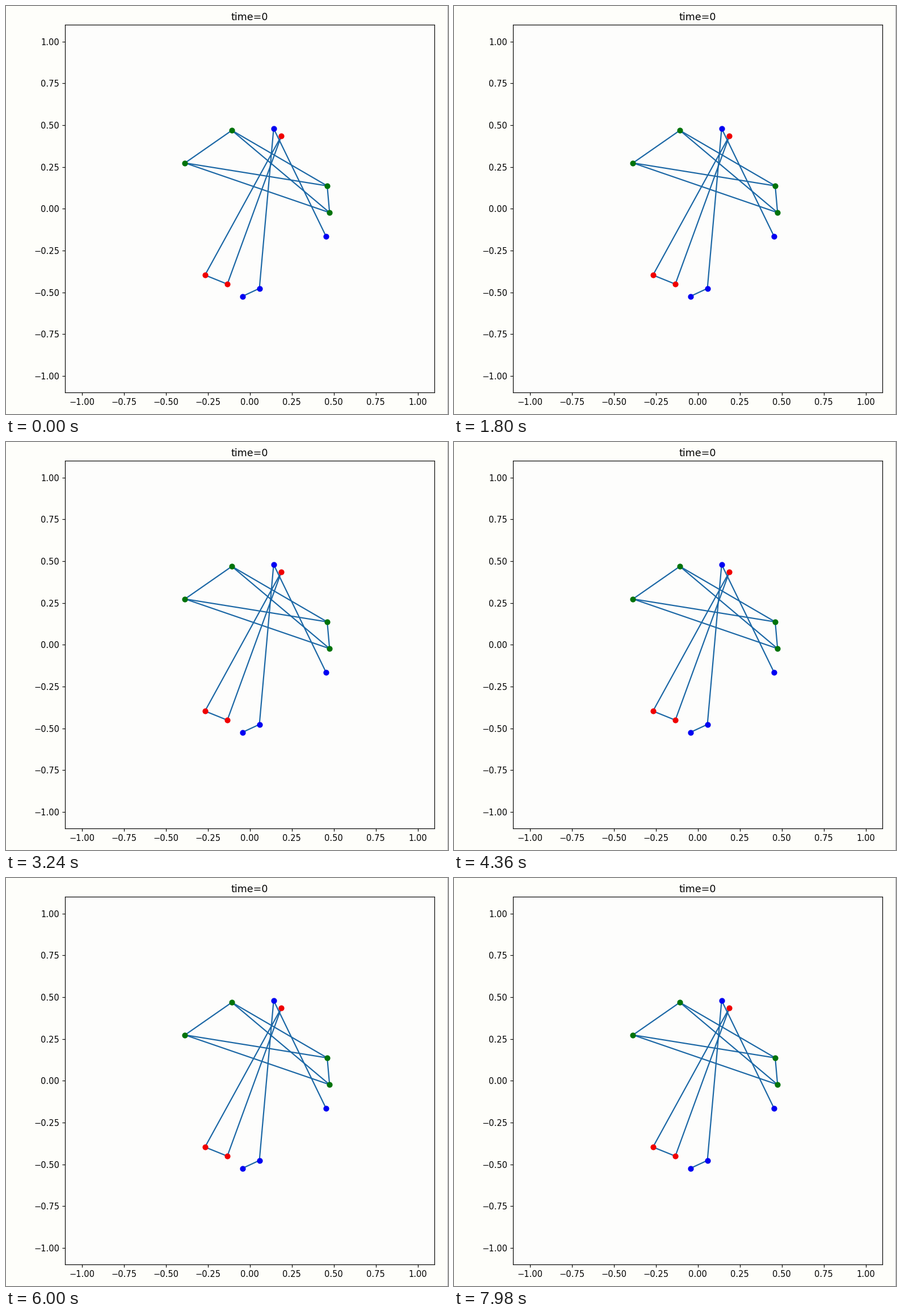
A matplotlib script for the animation above (8000 ms loop, 779 px wide and 719 px high).

```python
from itertools import combinations, pairwise

import matplotlib.pyplot as plt
import numpy as np
from matplotlib.animation import FuncAnimation
from matplotlib.lines import Line2D

W, H, DPI = 779, 719, 105
FRAMES, INTERVAL = 20, 400
LEFT, RIGHT, TOP, BOTTOM = 104.2, 755.2, 33.4, 681.2
LINE = "#1b67a5"


def links_all(nodes):
    return combinations(nodes, 2)


def links_chain(nodes):
    return pairwise(nodes)


# each cluster: colour, wiring rule, node positions
CLUSTERS = [
    ("#f00000", links_all,
     [(0.188, 0.436), (-0.267, -0.397), (-0.134, -0.451)]),
    ("#0000f2", links_chain,
     [(0.455, -0.167), (0.142, 0.480), (0.057, -0.477), (-0.044, -0.524)]),
    ("#00730a", links_all,
     [(-0.107, 0.469), (-0.386, 0.274), (0.461, 0.137), (0.475, -0.023)]),
]

plt.rcParams["font.family"] = "DejaVu Sans"

fig = plt.figure(figsize=((W + 0.001) / DPI, (H + 0.001) / DPI), dpi=DPI,
                 facecolor="#fefefa")
ax = fig.add_axes([LEFT / W, 1 - BOTTOM / H,
                   (RIGHT - LEFT) / W, (BOTTOM - TOP) / H],
                  facecolor="#fdfdfc")

# thin grey border in the last pixel column
fig.add_artist(Line2D([(W - 0.75) / W] * 2, [0, 1], color="#b4b4b4",
                      lw=72 / DPI))

for color, links, nodes in CLUSTERS:
    for ends in links(nodes):
        ax.plot(*zip(*ends), color=LINE, lw=1.5, zorder=2)
    ax.plot(*zip(*nodes), "o", color=color, ms=6, zorder=3)

ticks = np.arange(-1, 1.01, 0.25)
ax.set(xlim=(-1.1, 1.1), ylim=(-1.1, 1.1), xticks=ticks, yticks=ticks)
title = ax.set_title("", fontsize=12)


def update(frame):
    # the clock stays at zero and the graph holds its pose through the loop
    title.set_text("time=0")
    return [title]


anim = FuncAnimation(fig, update, frames=FRAMES, interval=INTERVAL,
                     init_func=lambda: update(0), repeat=True,
                     repeat_delay=0, blit=False)
plt.show()
```
